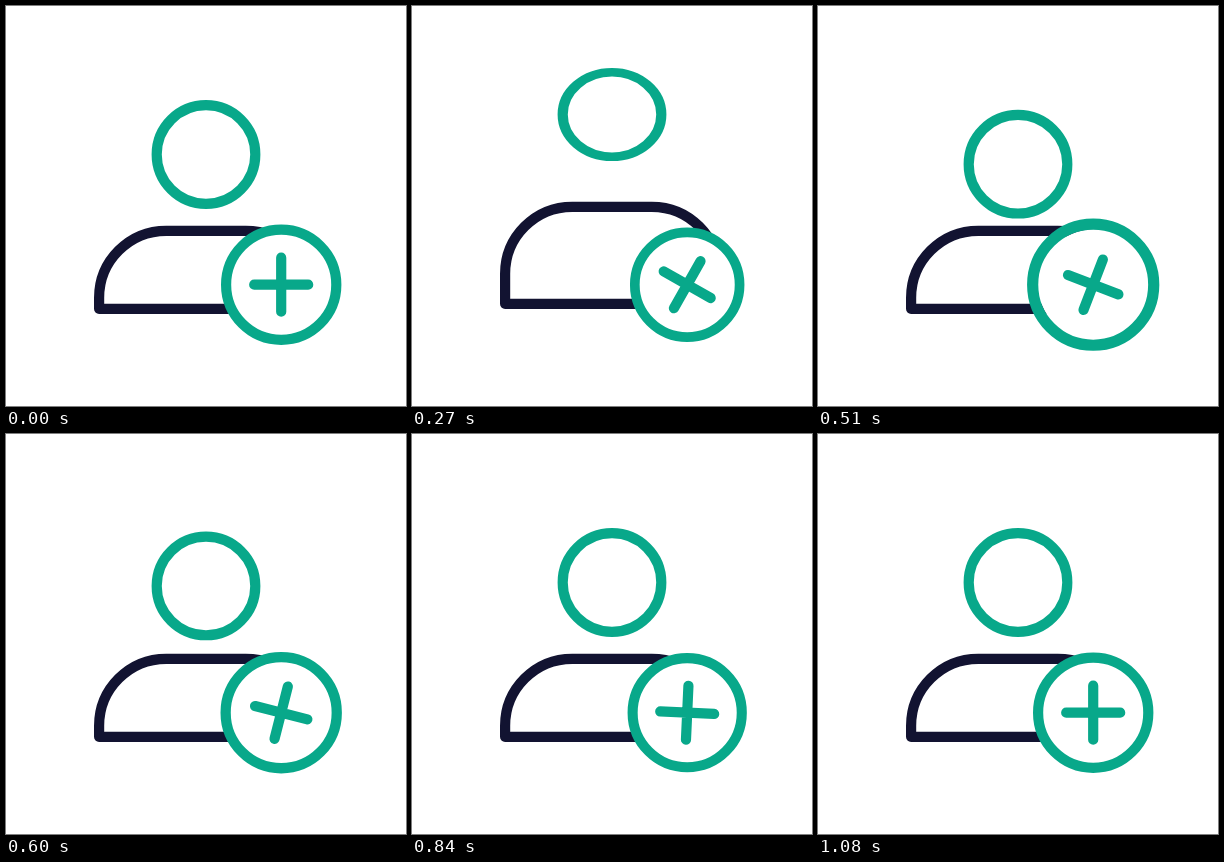
Recreate the animation shown at these times as an HTML page. Size 400 by 400 pixels, loop 1.11 s.

```html
<!DOCTYPE html>
<html lang="en">
<head>
<meta charset="utf-8">
<title>Add user</title>
<style>
  html, body { margin: 0; width: 100%; height: 100%; overflow: hidden; background: #fff; }
  svg { display: block; width: 100%; height: 100%; }
</style>
</head>
<body>
<svg viewBox="0 0 400 400" fill="none" stroke="#08a88a" stroke-width="10.2" stroke-linecap="round" stroke-linejoin="round">
  <path id="body" stroke="#121331"/>
  <g id="head"><circle r="49.3"/></g>
  <g transform="translate(275.2 278.7)">
    <circle r="55.2" fill="#fff" stroke="none"/>
    <circle id="ring" r="55.1"/>
    <path id="plus" d="M-27 0H27M0-27V27"/>
  </g>
</svg>
<script>
const LOOP = 1110, STEP = 30;
const RISEN = 167, FALL = 333, LANDED = 500, SETTLED = 667;
const [body, head, ring, plus] = ['body', 'head', 'ring', 'plus'].map(id => document.getElementById(id));

const progress = (t, from, to) => Math.min(1, Math.max(0, (t - from) / (to - from)));
const smooth = x => x * x * (3 - 2 * x);
const easeOut = x => 1 - (1 - x) ** 2;
const ramp = (t, from, to) => smooth(progress(t, from, to));
// Rises to 1, holds, then falls back to 0.
const pulse = (t, up, top, down, end) => ramp(t, up, top) - ramp(t, down, end);

function bodyPath(lift) {
  const radius = 67.1, left = 93.1, right = 400 - left;
  const top = 224.8 - 24 * lift, bottom = 302.8 - 5 * lift, side = top + radius;
  const arc = `A${radius} ${radius} 0 0 1`;
  return `M${left} ${bottom}V${side}${arc} ${left + radius} ${top}H${right - radius}${arc} ${right} ${side}V${bottom}Z`;
}

function draw(t) {
  // The figure jumps, hangs with a squashed head, and dips on landing.
  const lift = pulse(t, 0, RISEN, FALL, LANDED);
  const squash = pulse(t, 0, RISEN, FALL, 450);
  const dip = pulse(t, 350, LANDED, LANDED, SETTLED);
  body.setAttribute('d', bodyPath(lift));
  head.setAttribute('transform', `translate(200 ${148.5 - 40 * lift + 9.8 * dip}) scale(1 ${1 - 0.143 * squash})`);

  // The badge shrinks, swells past its size, then rebounds.
  const shrink = pulse(t, 0, RISEN, RISEN, 480);
  const swell = pulse(t, RISEN, 480, LANDED, SETTLED);
  const rebound = pulse(t, LANDED, SETTLED, SETTLED, 917);
  ring.setAttribute('transform', `scale(${1 + 0.1 * (swell - shrink) - 0.042 * rebound})`);

  // The plus winds back, turns past a half turn and eases home.
  const windUp = 17.8 * ramp(t, 0, RISEN);
  const turn = 218.8 * ramp(t, RISEN, 510);
  const comeBack = 21 * easeOut(progress(t, 510, 1020));
  plus.setAttribute('transform', `rotate(${turn - windUp - comeBack})`);
}

const start = performance.now();
function tick() {
  const t = (performance.now() - start) % LOOP;
  draw(Math.floor(t / STEP) * STEP);
  requestAnimationFrame(tick);
}
draw(0);
requestAnimationFrame(tick);
</script>
</body>
</html>
```
